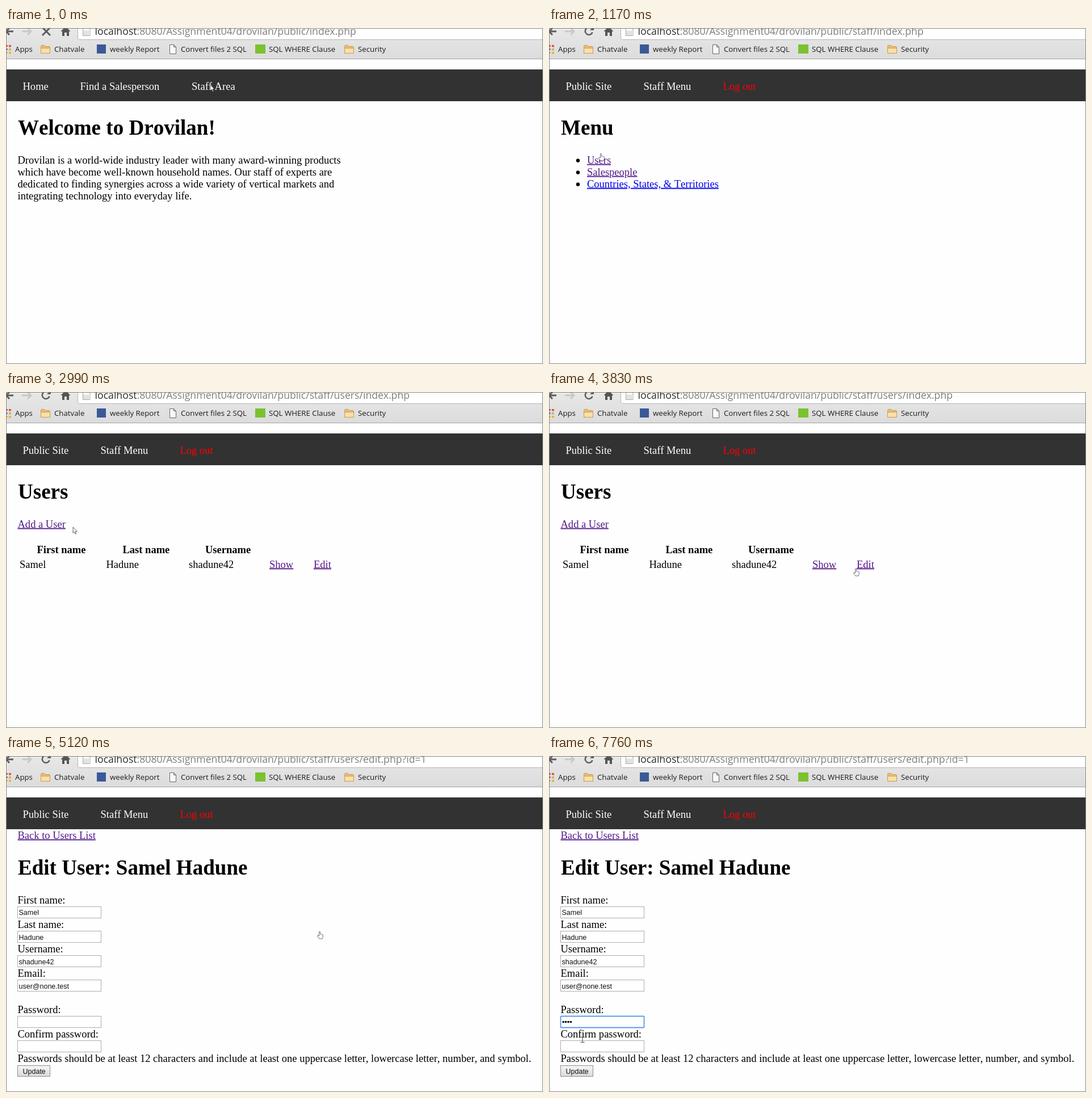
Recreate the animation shown at these times as an HTML page. Size 946 by 592 pixels, loop 8 s.

```html
<!DOCTYPE html>
<html lang="en">
<head>
<meta charset="utf-8">
<title>Staff pages walkthrough</title>
<style>
html, body { margin: 0; width: 100%; height: 100%; overflow: hidden; background: #fefefe; }
svg { display: block; width: 100%; height: 100%; }
text { font: 18.53px "Liberation Serif", Times, serif; font-kerning: none; white-space: pre; }
.h1 { font-size: 37.06px; font-weight: bold; }
.th { font-weight: bold; }
.ui text { font: 13.25px "Open Sans", "Noto Sans", sans-serif; fill: #1c1c1c; }
.ui .url { font-size: 17.68px; fill: #7e7e7e; }
.url tspan { fill: #2b2b2b; }
.ui .bold { font-size: 13.1px; font-weight: bold; fill: #111; }
.nav text { fill: #fff; }
.nav .out { fill: #f00; }
.link { fill: #551a8b; text-decoration: underline; }
.new { fill: #00e; }
.field text, .button { font: 12.5px "Liberation Sans", Arial, sans-serif; fill: #111; }
.field rect { fill: #fff; stroke: #adadad; }

/* Everything changes in hard steps on one 8 s clock (1% = 80 ms). */
.t { opacity: 0; animation: 8s step-end infinite; }
.home { animation-name: home; }
.staff { animation-name: staff; }
.menu { animation-name: menu; }
.users { animation-name: users; }
.edit { animation-name: edit; }
.focus { animation-name: focus; }
.popup { animation-name: popup; }
.two { animation-name: two; }
.three { animation-name: three; }
.four { animation-name: four; }
.caret { animation-name: caret; }
.arrow { animation-name: arrow; }
.hand { animation-name: hand; }
.beam { animation-name: beam; }
.pointer { animation: move 8s step-end infinite; }

@keyframes home { 0% { opacity: 1 } 3.5% { opacity: 0 } }
@keyframes staff { 3.5% { opacity: 1 } }
@keyframes menu { 3.5% { opacity: 1 } 21.875% { opacity: 0 } }
@keyframes users { 21.875% { opacity: 1 } 62.25% { opacity: 0 } }
@keyframes edit { 62.25% { opacity: 1 } }
@keyframes focus { 79.25% { opacity: 1 } }
@keyframes popup { 79.25% { opacity: 1 } 81.25% { opacity: 0 } }
@keyframes two { 83.125% { opacity: 1 } }
@keyframes three { 84.625% { opacity: 1 } }
@keyframes four { 88.125% { opacity: 1 } }
@keyframes caret {
  79.25% { opacity: 1; transform: none }
  83.125% { opacity: 1; transform: translateX(9px) }
  84.625% { opacity: 1; transform: translateX(13px) }
  88.125% { opacity: 1; transform: translateX(17.5px) }
  93.125% { opacity: 0 }
}
@keyframes arrow {
  0% { opacity: 1 } 14.625% { opacity: 0 }
  35.875% { opacity: 1 } 47.875% { opacity: 0 }
  68.75% { opacity: 1 } 75.75% { opacity: 0 }
}
@keyframes hand {
  14.625% { opacity: 1 } 35.875% { opacity: 0 }
  47.875% { opacity: 1 } 68.75% { opacity: 0 }
}
@keyframes beam { 75.75% { opacity: 1 } }
@keyframes move {
  0% { transform: translate(360px, 100px) }
  5.75% { transform: translate(356px, 102px) }
  9.25% { transform: translate(310px, 124px) }
  11% { transform: translate(225px, 165px) }
  12.75% { transform: translate(135px, 204px) }
  14.625% { transform: translate(92px, 221px) }
  16.625% { transform: translate(89px, 225px) }
  18.375% { transform: translate(87px, 227px) }
  35.875% { transform: translate(118px, 238px) }
  37.625% { transform: translate(190px, 257px) }
  39.25% { transform: translate(292px, 287px) }
  41% { transform: translate(402px, 316px) }
  42.75% { transform: translate(492px, 330px) }
  44.375% { transform: translate(541px, 328px) }
  46.125% { transform: translate(543px, 319px) }
  47.875% { transform: translate(541px, 311px) }
  53.25% { transform: translate(548px, 310px) }
  54.75% { transform: translate(553px, 309px) }
  68.75% { transform: translate(554px, 312px) }
  70.5% { transform: translate(490px, 338px) }
  72.25% { transform: translate(330px, 390px) }
  74% { transform: translate(165px, 433px) }
  75.75% { transform: translate(75px, 451px) }
  77.5%, 79.25% { transform: translate(46px, 457px) }
  93.125% { transform: translate(49px, 466px) }
  95% { transform: translate(55px, 485px) }
  97%, 100% { transform: translate(59px, 500px) }
}
</style>
</head>
<body>
<svg viewBox="0 0 946 592">
  <defs>
    <linearGradient id="bar" x2="0" y2="1">
      <stop stop-color="#e8e8e8"/><stop offset="1" stop-color="#dcdcdc"/>
    </linearGradient>
    <linearGradient id="btn" x2="0" y2="1">
      <stop stop-color="#f6f6f6"/><stop offset="1" stop-color="#dadada"/>
    </linearGradient>
    <g id="folder" stroke="#c99a54">
      <path d="M.5 14.5v-12q0-2 2-2h4l2 2h6q2 0 2 2v10z" fill="#e9bd75"/>
      <path d="M.5 5.5h16v7q0 2-2 2h-12q-2 0-2-2z" fill="#fbdfa9"/>
    </g>
  </defs>

  <rect width="946" height="592" fill="#fefefe"/>

  <!-- Browser bar -->
  <g class="ui">
    <rect width="946" height="54" fill="url(#bar)"/>
    <path d="M0 54.5H946" stroke="#a3a3a3"/>
    <path d="M126.5-2V17q0 3.500 3.500 3.500H947V-2z" fill="#fff" stroke="#b4b4b4"/>
    <g fill="none" stroke-width="3">
      <path d="M13 6H2M6 0 0 6l6 6" stroke="#5c5c5c"/>
      <path d="M28 6h15M38 0l6 6-6 6" stroke="#c9c9c9"/>
      <path class="t home" d="M64-1 78 13M78-1 64 13" stroke="#5c5c5c"/>
      <g class="t staff" stroke="#5c5c5c">
        <path d="M76.500 7.500A6.500 6.500 0 1 1 74.500.500" stroke-width="2.500"/>
        <path d="M72 4h7V-3z" fill="#5c5c5c" stroke="none"/>
      </g>
    </g>
    <path d="M105-3 96.500 6H99v8h4V8h4v6h4V6h2.500z" fill="#555"/>
    <path d="M135.500-2V13.500h12.500V-2" fill="#f7f7f7" stroke="#a9a9a9"/>
    <path d="M136 5h12v8h-12z" fill="#e3e3e3"/>

    <text class="url t home" x="156.500" y="12"><tspan>localhost</tspan>:8080/Assignment04/drovilan/public/index.php</text>
    <text class="url t menu" x="156.500" y="12"><tspan>localhost</tspan>:8080/Assignment04/drovilan/public/staff/index.php</text>
    <text class="url t users" x="156.500" y="12"><tspan>localhost</tspan>:8080/Assignment04/drovilan/public/staff/users/index.php</text>
    <text class="url t edit" x="156.500" y="12"><tspan>localhost</tspan>:8080/Assignment04/drovilan/public/staff/users/edit.php?id=1</text>

    <path d="M0 30h3v3H0z" fill="#e0503f"/><path d="M5 30h4v3.500H5z" fill="#e0503f"/>
    <path d="M0 36h3v3H0z" fill="#4d8fe0"/><path d="M5 36h4v3.500H5z" fill="#e9a93a"/>
    <path d="M0 42h3v3H0zM5 42h4v3.500H5z" fill="#e9b03e"/>
    <use href="#folder" x="61" y="30"/>
    <use href="#folder" x="596" y="30"/>
    <path d="M160 29h16v16h-16z" fill="#3b5998"/>
    <path d="M288.500 29.500h7l4 4v12h-11zM295.500 29.500v4h4" fill="#fafafa" stroke="#666"/>
    <path d="M439 29h18v16h-18z" fill="#7ac22f"/>
    <text x="16" y="42">Apps</text>
    <text x="85" y="42">Chatvale</text>
    <text x="183" y="42">weekly Report</text>
    <text x="308" y="42">Convert files 2 SQL</text>
    <text x="463" y="42">SQL WHERE Clause</text>
    <text x="620" y="42">Security</text>
  </g>

  <!-- Navigation -->
  <rect y="73" width="946" height="56" fill="#323232"/>
  <g class="nav t home">
    <text x="29.500" y="108.500">Home</text>
    <text x="130.500" y="108.500">Find a Salesperson</text>
    <text x="327" y="108.500">Staff Area</text>
  </g>
  <g class="nav t staff">
    <text x="29.500" y="108.500">Public Site</text>
    <text x="166.500" y="108.500">Staff Menu</text>
    <text class="out" x="306.500" y="108.500">Log out</text>
  </g>

  <!-- Pages -->
  <g class="t home">
    <text class="h1" x="21" y="187.500">Welcome to Drovilan!</text>
    <text y="238.700">
      <tspan x="20.500">Drovilan is a world-wide industry leader with many award-winning products</tspan>
      <tspan x="20.500" dy="21">which have become well-known household names. Our staff of experts are</tspan>
      <tspan x="20.500" dy="21">dedicated to finding synergies across a wide variety of vertical markets and</tspan>
      <tspan x="20.500" dy="21">integrating technology into everyday life.</tspan>
    </text>
  </g>

  <g class="t menu">
    <text class="h1" x="21" y="187.500">Menu</text>
    <circle cx="51" cy="233.500" r="3.200"/>
    <circle cx="51" cy="254.500" r="3.200"/>
    <circle cx="51" cy="275.500" r="3.200"/>
    <text class="link" x="67" y="238.700">Users</text>
    <text class="link" x="67" y="259.700">Salespeople</text>
    <text class="link new" x="67" y="280.700">Countries, States, &amp; Territories</text>
  </g>

  <g class="t users">
    <text class="h1" x="21" y="187.500">Users</text>
    <text class="link" x="20.500" y="238.700">Add a User</text>
    <text class="th" x="54.500" y="284">First name</text>
    <text class="th" x="205.500" y="284">Last name</text>
    <text class="th" x="351" y="284">Username</text>
    <text x="24" y="309.500">Samel</text>
    <text x="176.500" y="309.500">Hadune</text>
    <text x="322" y="309.500">shadune42</text>
    <text class="link" x="464" y="309.500">Show</text>
    <text class="link" x="542" y="309.500">Edit</text>
  </g>

  <g class="t edit">
    <text class="link" x="20.500" y="145.700">Back to Users List</text>
    <text class="h1" x="21" y="208.500">Edit User: Samel Hadune</text>
    <text x="20.500" y="259.700">First name:</text>
    <text x="20.500" y="302.700">Last name:</text>
    <text x="20.500" y="345.700">Username:</text>
    <text x="20.500" y="388.700">Email:</text>
    <text x="20.500" y="452.700">Password:</text>
    <text x="20.500" y="495.700">Confirm password:</text>
    <text x="20.500" y="538.700">Passwords should be at least 12 characters and include at least one uppercase letter, lowercase letter, number, and symbol.</text>
    <g class="field">
      <rect x="20.500" y="265.500" width="147" height="20"/>
      <rect x="20.500" y="308.500" width="147" height="20"/>
      <rect x="20.500" y="351.500" width="147" height="20"/>
      <rect x="20.500" y="394.500" width="147" height="20"/>
      <rect x="20.500" y="458.500" width="147" height="20"/>
      <rect x="20.500" y="501.500" width="147" height="20"/>
      <text x="22.500" y="280.300">Samel</text>
      <text x="22.500" y="323.500">Hadune</text>
      <text x="22.500" y="366.500">shadune42</text>
      <text x="22.500" y="409.500">user@none.test</text>
    </g>
    <rect x="20.500" y="545.500" width="57" height="19" fill="url(#btn)" stroke="#8e8e8e"/>
    <text class="button" x="29.500" y="559.500">Update</text>

    <rect class="t focus" x="20.500" y="458.500" width="147" height="20" rx="1" fill="#fff" stroke="#5b9be8" stroke-width="1.800"/>
    <g class="t two"><circle cx="25.200" cy="468.500" r="1.800"/><circle cx="29.600" cy="468.500" r="1.800"/></g>
    <circle class="t three" cx="34" cy="468.500" r="1.800"/>
    <circle class="t four" cx="38.400" cy="468.500" r="1.800"/>
    <path class="t caret" d="M23.500 462v14" stroke="#000" stroke-width="1.300"/>
    <g class="ui t popup">
      <rect x="20.500" y="479.500" width="147" height="57" fill="#fff" stroke="#c6c6c6"/>
      <text class="bold" x="30.500" y="498.300">Use password for:</text>
      <text class="bold" x="30.500" y="526.300">shadune42</text>
    </g>
  </g>

  <path d="M.5.5h945v591H.5z" fill="none" stroke="#858585"/>

  <!-- Mouse pointer -->
  <g class="pointer">
    <path class="t arrow" d="M0 0v10.500l2.400-2.200 1.700 3.900 1.600-.7-1.700-3.800h3.300z" fill="#fff" stroke="#222" stroke-width=".7"/>
    <path class="t hand" d="M-1.500 8V1.200q0-1.200 1-1.200t1 1.200V5q1-.6 1.700.2 1-.5 1.600.4 1.500-.3 1.500 1.200V9.500L4 13h-5L-4.500 8.500q-.3-1.800 1.300-1.300z" fill="#fff" stroke="#555a72" stroke-width=".9"/>
    <path class="t beam" d="M-3.500-4.500h2.500q1 0 1 1 0-1 1-1h2.500M0-3.500v7M-3.500 4.500h2.500q1 0 1-1 0 1 1 1h2.500" fill="none" stroke="#444"/>
  </g>
</svg>
</body>
</html>
```
